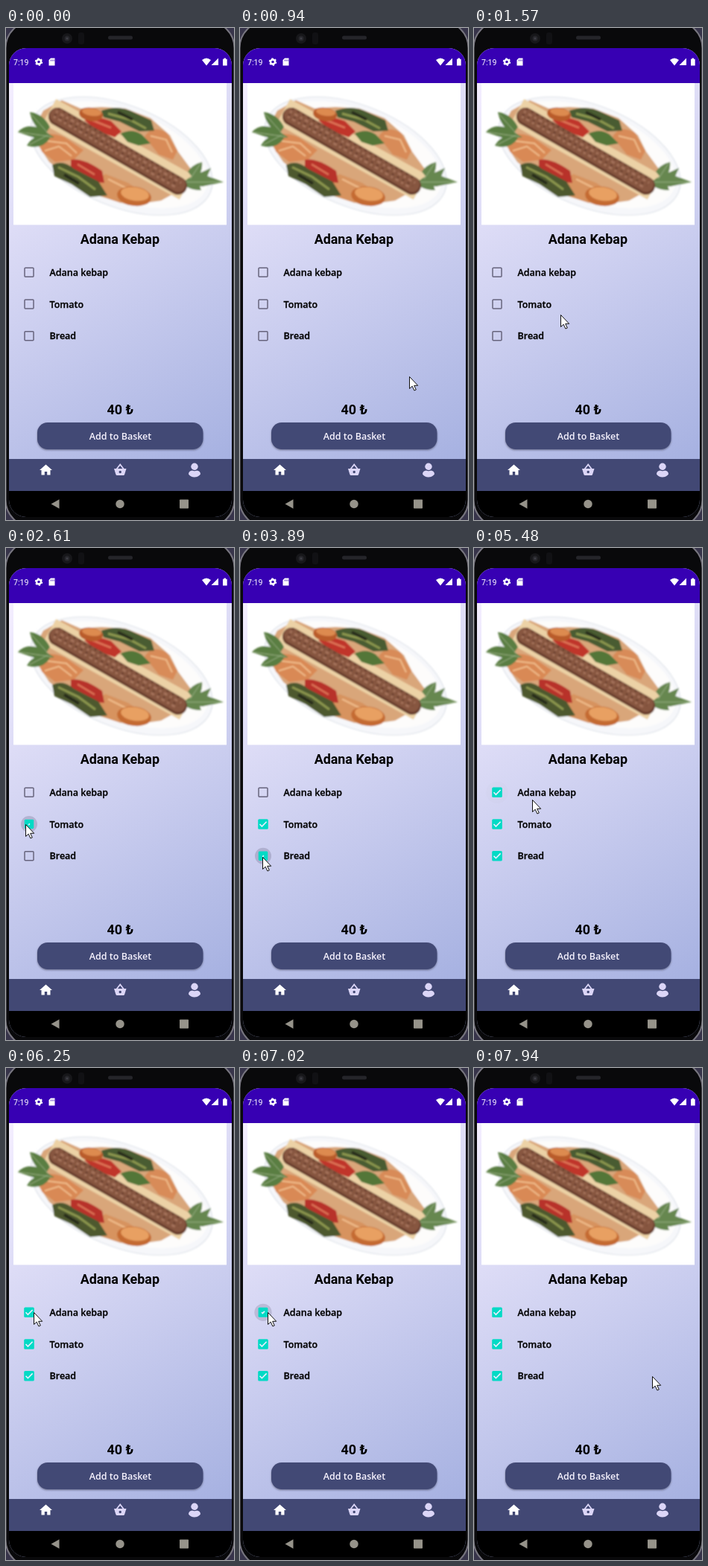
Write an HTML page that moves like this. It is 306 px wide and 661 px high and loops after 8000 ms.

```html
<!DOCTYPE html>
<html lang="en">
<head>
<meta charset="utf-8">
<title>Food order</title>
<style>
  html, body { margin: 0; width: 100%; height: 100%; overflow: hidden; background: #09090b; }
  svg { display: block; width: 100%; height: 100%; }
  text { font: 600 12.5px "Open Sans", sans-serif; }
  .label { stroke: #000; stroke-width: .3; }
  .bold { font: 700 17.9px Roboto, sans-serif; text-anchor: middle; }
  .clock { font: 400 10.6px Roboto, sans-serif; fill: #fff; }
  .button { text-anchor: middle; fill: #f7f3ff; }
  .tick { vector-effect: non-scaling-stroke; }
</style>
</head>
<body>
<svg viewBox="0 0 306 661">
  <defs>
    <linearGradient id="page" gradientUnits="userSpaceOnUse" x1="4" y1="74" x2="303" y2="579">
      <stop offset="0" stop-color="#f4eeff"/>
      <stop offset="1" stop-color="#a6b1e1"/>
    </linearGradient>
    <clipPath id="screen"><rect x="4" y="27" width="299" height="630" rx="23"/></clipPath>
    <clipPath id="photo"><rect x="10" y="74" width="286" height="190.5"/></clipPath>
    <filter id="shadow" x="-10%" y="-20%" width="120%" height="150%">
      <feDropShadow dx="0" dy="1.2" stdDeviation="1.2" flood-color="#223" flood-opacity=".5"/>
    </filter>
    <filter id="soft"><feGaussianBlur stdDeviation=".9"/></filter>
  </defs>

  <!-- phone body -->
  <rect width="306" height="661" fill="#37344a"/>
  <rect x="-.5" y="-9" width="307" height="679" rx="36" fill="#09090b" stroke="#77757f" stroke-width="2"/>
  <circle cx="82" cy="14" r="7" fill="#17171a"/>
  <circle cx="82" cy="14" r="3.5" fill="#26262b"/>
  <circle cx="82" cy="14" r="1.5" fill="#3d3d45"/>
  <rect x="97" y="6" width="8" height="16" rx="3" fill="#111114"/>
  <rect x="137" y="10.5" width="33" height="5" rx="2.5" fill="#25252a"/>

  <g clip-path="url(#screen)">
    <rect x="4" y="27" width="299" height="630" fill="url(#page)"/>
    <rect x="4" y="27" width="299" height="47" fill="#3700b3"/>

    <!-- status bar -->
    <text class="clock" x="10" y="49.5">7:19</text>
    <circle cx="44" cy="45.5" r="3" fill="none" stroke="#fff" stroke-width="2.4"/>
    <circle cx="44" cy="45.5" r="4.4" fill="none" stroke="#fff" stroke-width="1.7" stroke-dasharray="2.3 2.3"/>
    <path d="M60 40.5h5.5v10h-8v-7.5z" fill="#fff"/>
    <path d="M60.2 42.5v2m2-2v2m2-2v2" stroke="#3700b3" stroke-width=".8"/>
    <path d="M263 43q6-5 12 0l-6 7.5zM285 40.5v9.5h-9.5zM292.5 40.5h2.5v1.2h1.7v8.8h-5.7v-8.8h1.5z" fill="#fff"/>

    <!-- dish -->
    <rect x="10" y="74" width="286" height="190.5" fill="#fff"/>
    <g clip-path="url(#photo)">
      <g filter="url(#soft)">
        <g transform="translate(155 172) rotate(22)">
          <ellipse rx="129" ry="68" fill="#f6f7fa" stroke="#dfe3ea" stroke-width="1.2"/>
          <ellipse cy="-2" rx="122" ry="60" fill="#fdfcfb"/>
        </g>
        <path d="M41 128 50 111 75 97 100 108 128 106 160 108 194 121 220 144 231 166 250 192 242 213 208 232 165 238 126 226 88 204 58 180 42 156z" fill="#d9a67a"/>
        <path d="M58 112 242 214" stroke="#ecd2a6" stroke-width="38"/>
        <!-- carrot -->
        <path d="M43 147q18-9 36 0l25 17-13 13-25 3-18-14z" fill="#d98955"/>
        <path d="M186 146q10-17 30-5l14 24-6 12-19-7z" fill="#d88b58"/>
        <path d="M133 196l31 12 17 12-27 15-23-8-14-17z" fill="#d7935f"/>
        <path d="M49 151l32 4 14 13M52 165l19-6 17 13M194 145l21 5 8 17M137 203l26 13" fill="none" stroke="#f0bd8c" stroke-width="2"/>
        <!-- peppers and tomatoes -->
        <path d="M87 177q16-3 42 15l3 16-23-2-22-14z" fill="#b8302b"/>
        <path d="M105 124q17-7 36 1l14 14-9 8-24-9z" fill="#c0362c"/>
        <path d="M62 184q14-8 29 5l33 17 12 19-23 2-25-17-23-11z" fill="#4d592e"/>
        <path d="M128 111q24-9 45 3l22 10 4 14-20 1-26-13-22-6z" fill="#4a5c30"/>
        <path d="M154 142q15-8 28 1l12 12-16 3-15-5z" fill="#527638"/>
        <path d="M70 187l27 13 23 17M137 115l29 8 22 12" fill="none" stroke="#8d984f" stroke-width="3"/>
        <path d="M78 197l20 12m52-96 20 10" fill="none" stroke="#272c1d" stroke-width="4"/>
        <path d="M96 183l23 14m-3-73 25 10" fill="none" stroke="#dd7457" stroke-width="2.5"/>
        <ellipse cx="114" cy="116" rx="16" ry="9" transform="rotate(8 114 116)" fill="#b95b2b"/>
        <ellipse cx="115" cy="113" rx="13" ry="5" transform="rotate(8 115 113)" fill="#dd8b50"/>
        <ellipse cx="172" cy="226" rx="23" ry="13" transform="rotate(8 172 226)" fill="#c46a30"/>
        <ellipse cx="173" cy="223" rx="19" ry="9" transform="rotate(8 173 223)" fill="#e8a062"/>
        <!-- leaves -->
        <path d="M16 140q10-12 28-6l21 13-25 1zM32 113q18 2 27 20l-6 9q-17-8-21-29zM28 158q8-14 27-17l4 7q-10 16-31 10z" fill="#5a7e43"/>
        <path d="M239 207q12-13 29-9l24 9-29 6zM244 193q6-10 19-13 2 13-9 25zM232 204l26 2 4 12q-20 0-30-14zM251 199l24-11-6 14-16 6z" fill="#668750"/>
        <path d="M18 140 61 146M34 116l23 26M31 157l25-13M242 207 289 207M247 203l14-21" stroke="#9ab184" fill="none"/>
        <!-- meat -->
        <path d="M69 119 231 212" stroke="#6c412f" stroke-width="24" stroke-linecap="round"/>
        <path d="M69 117 231 210" stroke="#875641" stroke-width="20" stroke-linecap="round"/>
        <path d="M67 112 235 208M64 119 228 214" stroke="#a5735c" stroke-width="3" stroke-dasharray="3 4 5 4" fill="none"/>
        <path d="M70 108 236 203M65 116 232 212" stroke="#6b402e" stroke-width="2.5" stroke-dasharray="3 5" fill="none"/>
      </g>
    </g>

    <text class="bold" x="152.8" y="290">Adana Kebap</text>
    <g id="rows"></g>
    <text class="bold" x="153.3" y="519">40 ₺</text>

    <rect x="42" y="530" width="222.5" height="36" rx="14" fill="#424874" filter="url(#shadow)"/>
    <text class="button" x="153.5" y="553">Add to Basket</text>

    <!-- tab bar -->
    <rect x="4" y="579" width="299" height="43" fill="#424874"/>
    <path d="M53.5 586.5l8.5 7.5h-2.5v6.5h-4.3v-4.5h-3.4v4.5h-4.3v-6.5h-2.5z" fill="#fff"/>
    <g fill="#dcd6f7">
      <path d="M145 592h16.5l-2.3 7.5q-.4 1.5-1.7 1.5h-8.5q-1.300 0-1.700-1.500z"/>
      <path d="M148.500 592.500l4.700-6 4.700 6" fill="none" stroke="#dcd6f7" stroke-width="1.700"/>
      <circle cx="153.200" cy="596.500" r="1.700" fill="#424874"/>
      <circle cx="253" cy="589.300" r="4.700"/>
      <path d="M245 599.500q0-4.500 5-5 3 1.500 6 0 5 .5 5 5-3 4-8 4t-8-4z"/>
    </g>

    <!-- system navigation -->
    <rect x="4" y="622" width="299" height="35" fill="#000"/>
    <g fill="#96938a">
      <path d="M60.500 639.500l11-6.300v12.600z"/>
      <circle cx="153" cy="639.500" r="5.700"/>
      <rect x="233" y="633.500" width="12" height="12" rx=".8"/>
    </g>
  </g>

  <circle id="press" r="15" fill="#f0eb32" opacity=".62"/>
  <path id="cursor" d="M.5.5V16.500L4.200 13.200 6.900 19 9.300 18 6.700 12.300H11.700z" fill="#fff" stroke="#111" stroke-width="1" stroke-linejoin="round"/>
</svg>

<script>
const LOOP = 8000, APPEARS = 660, RIPPLE = 450, CHECK = 220;

// Pointer tip: time, x, y
const path = [
  [660, 252, 507], [1430, 183, 400], [1570, 116, 385], [1780, 54, 374], [2270, 26, 371],
  [2750, 26, 371], [3220, 30, 415], [3960, 30, 415], [4530, 35, 341], [4670, 35, 324],
  [5200, 35, 324], [5620, 99, 345], [5900, 99, 345], [6250, 37, 328],
  [7090, 37, 328], [7580, 202, 376], [7730, 202, 376], [7940, 239, 414]
];

// A press is held from down to up; its row toggles on release.
const presses = [
  { down: 2470, up: 2610, row: 1, on: true },
  { down: 3750, up: 3890, row: 2, on: true },
  { down: 4940, up: 5070, row: 0, on: true },
  { down: 6390, up: 6530, row: 0, on: false },
  { down: 6810, up: 6950, row: 0, on: true }
];

const byId = id => document.getElementById(id);
const clamp = v => Math.max(0, Math.min(1, v));

byId("rows").innerHTML = ["Adana kebap", "Tomato", "Bread"].map((label, i) => `
  <g transform="translate(31 ${328.3 + 42.7 * i})">
    <circle class="ripple" fill="#3c3450"/>
    <rect class="empty" x="-6" y="-6" width="12" height="12" rx="1" fill="none" stroke="#67647d" stroke-width="1.5"/>
    <g class="filled">
      <rect x="-6.8" y="-6.8" width="13.6" height="13.6" rx="1.6" fill="#03dac5"/>
      <path class="tick" d="M-4.5 0 -1.6 3 4.6 -3.3" fill="none" stroke="#eef" stroke-width="1.6"/>
    </g>
    <text class="label" x="27.5" y="4.7">${label}</text>
  </g>`).join("");

const rows = [...byId("rows").children].map(g => {
  const part = name => g.querySelector("." + name);
  return { ripple: part("ripple"), empty: part("empty"), filled: part("filled"), tick: part("tick") };
});

function show(el, visible) {
  el.setAttribute("visibility", visible ? "visible" : "hidden");
}

function pointerAt(t) {
  const next = path.findIndex(p => p[0] > t);
  if (next < 0) return path[path.length - 1].slice(1);
  if (next === 0) return path[0].slice(1);
  const [t0, x0, y0] = path[next - 1], [t1, x1, y1] = path[next];
  const k = (t - t0) / (t1 - t0);
  return [x0 + (x1 - x0) * k, y0 + (y1 - y0) * k];
}

function drawRow(row, index, t) {
  const last = presses.filter(p => p.row === index && p.up <= t).pop();
  const age = last ? t - last.up : Infinity;
  const checked = Boolean(last && last.on);
  const k = clamp(age / CHECK), fade = clamp(age / RIPPLE);
  show(row.empty, !checked);
  show(row.filled, checked);
  row.filled.setAttribute("transform", `scale(${0.92 + 0.08 * k})`);
  row.tick.setAttribute("transform", `scale(${0.2 + 0.8 * k})`);
  row.ripple.setAttribute("r", 11 + 4 * fade);
  row.ripple.setAttribute("opacity", 0.2 * (1 - fade));
}

function draw(t) {
  const at = `translate(${pointerAt(t).map(Math.round)})`;
  for (const id of ["cursor", "press"]) byId(id).setAttribute("transform", at);
  show(byId("cursor"), t >= APPEARS);
  show(byId("press"), presses.some(p => t >= p.down && t < p.up));
  rows.forEach((row, i) => drawRow(row, i, t));
}

const start = performance.now();
function tick() {
  draw((performance.now() - start) % LOOP);
  requestAnimationFrame(tick);
}
tick();
</script>
</body>
</html>
```
